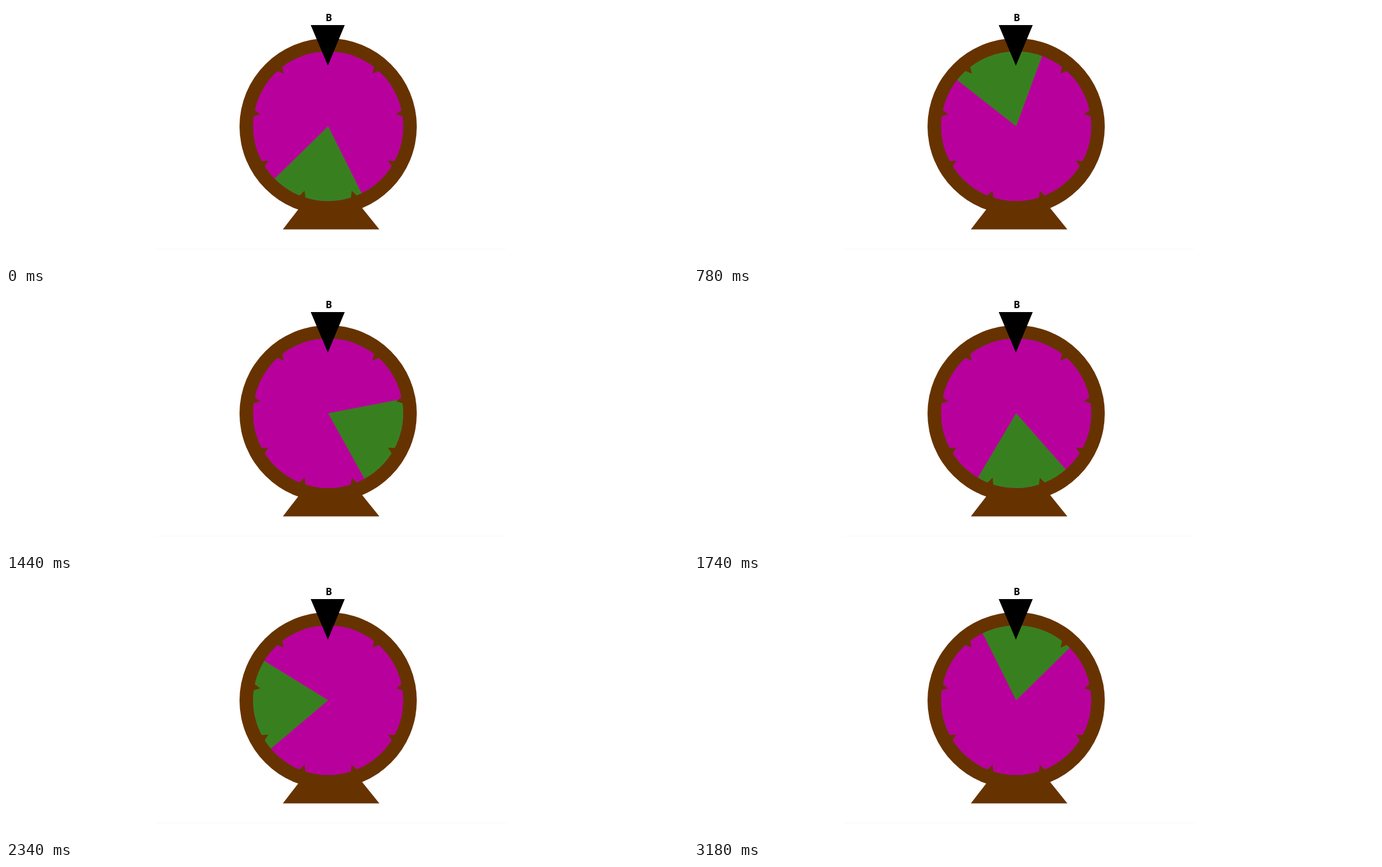
An HTML page that plays this animation: 1212x462 px, repeating every 3.24 s.

```html
<!DOCTYPE html>
<html lang="en">
<head>
<meta charset="utf-8">
<title>Spinning wheel</title>
<style>
  html, body { margin: 0; width: 100%; height: 100%; overflow: hidden; background: #fff; }
  svg { display: block; width: 100%; height: 100%; }
  text { font: bold 17px "Open Sans", "Noto Sans", sans-serif; text-anchor: middle; }
</style>
</head>
<body>
<svg viewBox="0 0 1212 462">
  <path d="M266 433.5H889" stroke="#f8f8f8"/>
  <g fill="#663300">
    <path d="M492 398.5H663.5L627 353H527Z"/>
    <circle cx="572.5" cy="215" r="157.5"/>
  </g>
  <g transform="translate(572.5 214.5)">
    <circle r="133.5" fill="#b8009c"/>
    <path id="wedge" fill="#38801f"/>
    <g id="teeth" fill="#663300"></g>
  </g>
  <path d="M541.5 34H602L572 106.5Z"/>
  <text x="573.7" y="27">B</text>
</svg>
<script>
const STEP = 60, LOOP = 3240, RADIUS = 133.5;
const START = 189.5;      // middle of the wedge, clockwise from the top
const CRUISE = 11.9;      // degrees per step in the first full turn
const HALF_START = 31, HALF_STEPS = 22, HALF_SPEED = 9.53;
const BRAKE = 2 * (HALF_STEPS - 180 / HALF_SPEED);

const polar = (deg, r) => {
  const a = deg * Math.PI / 180;
  return `${(r * Math.sin(a)).toFixed(2)} ${(-r * Math.cos(a)).toFixed(2)}`;
};

const wedge = document.getElementById("wedge");
wedge.setAttribute("d",
  `M0 0L${polar(-36, RADIUS)}A${RADIUS} ${RADIUS} 0 0 1 ${polar(36, RADIUS)}Z`);

let teeth = "";
for (let a = 40; a < 360; a += 40) {
  teeth += `<path d="M${polar(a - 2.6, 135)}L${polar(a, 122.5)}L${polar(a + 2.6, 135)}Z"/>`;
}
document.getElementById("teeth").innerHTML = teeth;

// One steady turn, then a half turn that brakes to a stop.
function turned(step) {
  if (step < HALF_START) return Math.min(360, CRUISE * step);
  const left = HALF_START + HALF_STEPS - step;
  const remaining = left > BRAKE
    ? HALF_SPEED * (left - BRAKE / 2)
    : HALF_SPEED * left * left / (2 * BRAKE);
  return 540 - remaining;
}

const begin = performance.now();
function draw() {
  const time = Math.max(0, performance.now() - begin) % LOOP;
  const angle = START + turned(Math.floor(time / STEP));
  wedge.setAttribute("transform", `rotate(${angle.toFixed(2)})`);
  requestAnimationFrame(draw);
}
draw();
</script>
</body>
</html>
```
